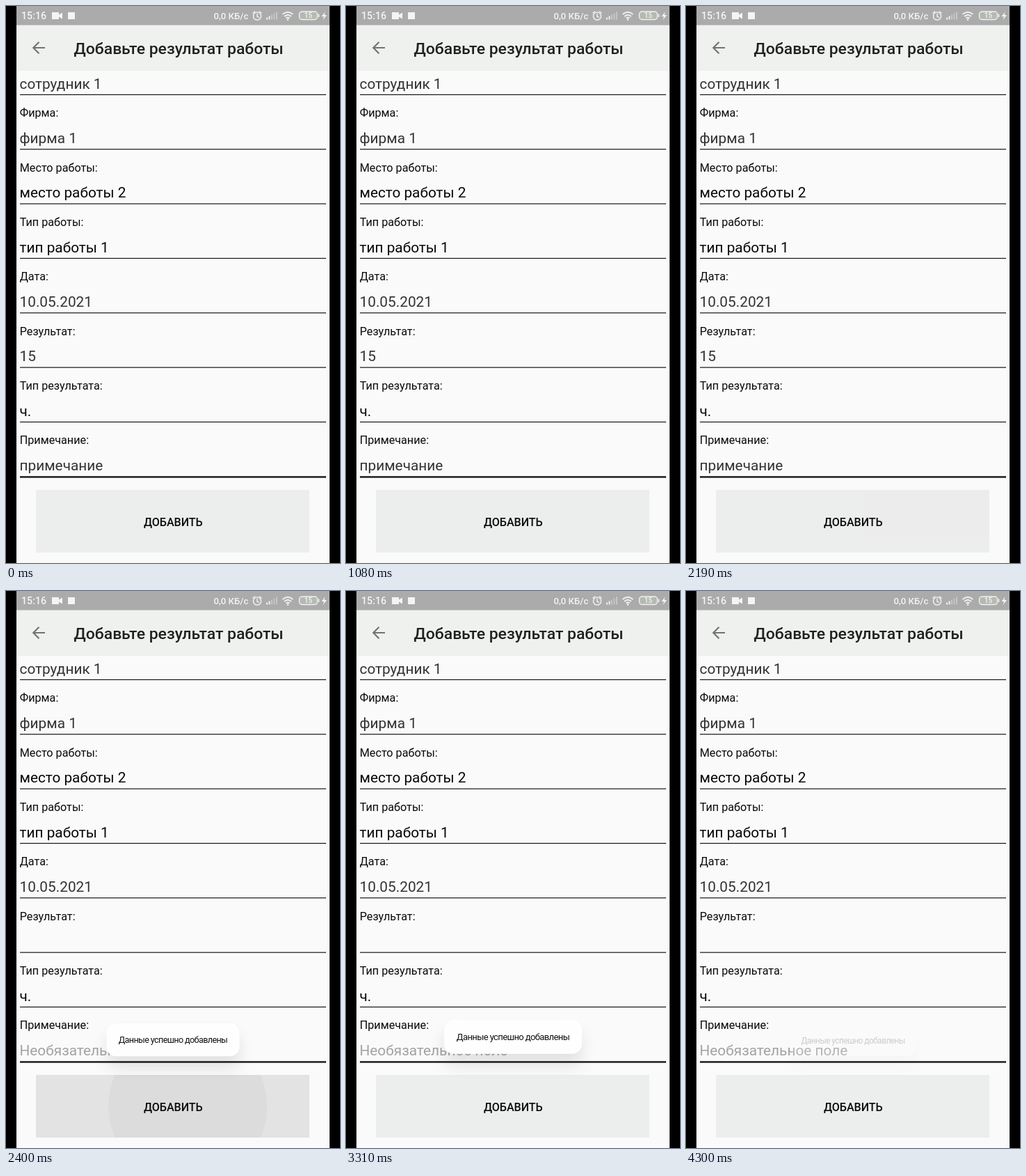
These frames come from a looping animation (480 by 800 pixels, 4.34 s). An HTML page:

```html
<!DOCTYPE html>
<html lang="ru">
<head>
<meta charset="utf-8">
<title>Добавьте результат работы</title>
<style>
html, body { margin: 0; width: 100%; height: 100%; overflow: hidden; background: #000; }
svg { display: block; width: 480px; height: 800px; font-family: Roboto, sans-serif; }
.label { font-size: 16.2px; fill: #0a0a0a; }
.field { font-size: 20.8px; }
.bar { font-size: 13.1px; font-weight: 500; fill: #f4f4f4; }
.line { fill: none; stroke: #f0f0f0; stroke-width: 1.5; }
.toast { font-size: 13px; letter-spacing: -.6px; fill: #111; }
</style>
</head>
<body>
<svg viewBox="0 0 480 800">
  <defs>
    <clipPath id="buttonClip"><rect x="43" y="695" width="393" height="90"/></clipPath>
    <filter id="blur" x="-30%" y="-100%" width="160%" height="300%"><feGaussianBlur stdDeviation="11"/></filter>
  </defs>
  <rect x="15" width="450" height="800" fill="#f9faf9"/>
  <rect x="15" y="27" width="450" height="66" fill="#eff1ef"/>
  <rect x="15" width="450" height="27.5" fill="#ababab"/>

  <!-- status bar -->
  <text class="bar" x="22" y="19" style="font-size:14.2px">15:16</text>
  <path d="M66 9h10v3.5l5-3v9l-5-3V19H66z" fill="#f4f4f4"/>
  <rect x="89" y="9" width="10" height="10" fill="#f4f4f4"/>
  <text class="bar" x="298.5" y="18.5">0,0 КБ/с</text>
  <g class="line">
    <circle cx="361" cy="14.5" r="5.6"/>
    <path d="M361 11v4l2.5 1.5M354.5 10.5l3.5-3M367.5 10.5l-3.5-3"/>
    <path d="M375 19.5v-3M378.5 19.5v-5" stroke-width="2"/>
    <path d="M382 19.5v-7M385.5 19.5v-9M389 19.5v-11" stroke-width="2" opacity=".4"/>
    <path d="M397.5 12q7.5-6.5 15 0M400 15q5-4.5 10 0M402.5 17.5q2.5-2 5 0" stroke-width="1.8"/>
    <rect x="421.5" y="8" width="26" height="11.5" rx="4" fill="#b4bab0"/>
    <path d="M449.5 11.5v4.5"/>
  </g>
  <circle cx="405" cy="19.5" r="1.3" fill="#f4f4f4"/>
  <text class="bar" x="434.5" y="17.4" text-anchor="middle" style="font-size:10px">15</text>
  <path d="M458.5 8.5l-5 6.5h3.5l-1.5 5 5.5-7h-3.5z" fill="#f4f4f4"/>

  <!-- header -->
  <path d="M56 60H39.5M47.5 51.8L39.3 60l8.2 8.2" fill="none" stroke="#737373" stroke-width="2.2"/>
  <text x="97.5" y="69" font-size="22.95" font-weight="500" fill="#202020">Добавьте результат работы</text>

  <g id="form"></g>

  <g clip-path="url(#buttonClip)">
    <rect x="43" y="695" width="393" height="90" fill="#eceeed"/>
    <g id="press">
      <rect x="43" y="695" width="393" height="90" fill="#e2e3e2"/>
      <circle id="ripple" cy="740" fill="#dadbda"/>
    </g>
  </g>
  <text x="240.3" y="746.5" text-anchor="middle" font-size="16" font-weight="500" fill="#0a0a0a">ДОБАВИТЬ</text>

  <g id="toast">
    <rect x="-99" y="-10" width="198" height="52" rx="14" opacity=".09" filter="url(#blur)"/>
    <rect x="-99" y="-24.5" width="198" height="49" rx="14" fill="#fefefe"/>
    <text class="toast" y="4.8" text-anchor="middle">Данные успешно добавлены</text>
  </g>
</svg>
<script>
const LOOP = 4340, PRESS = 2180, SHOW = 2200, HIDE = 4160;
const SOFT = "#333", DARK = "#080808", HINT = "#a3a3a3";
const ROWS = [
  ["", "сотрудник 1", SOFT],
  ["Фирма:", "фирма 1", SOFT],
  ["Место работы:", "место работы 2", DARK],
  ["Тип работы:", "тип работы 1", DARK],
  ["Дата:", "10.05.2021", SOFT],
  ["Результат:", "15", SOFT],
  ["Тип результата:", "ч.", DARK],
  ["Примечание:", "примечание", SOFT]
];
const $ = id => document.getElementById(id);
const ramp = (t, from, length) => Math.min(1, Math.max(0, (t - from) / length));
const set = (el, attrs) => { for (const k in attrs) el.setAttribute(k, attrs[k]); };

$("form").innerHTML = ROWS.map(([label, value, color], i) => {
  const y = 127.4 + i * 78.35;
  const focused = i === ROWS.length - 1;
  return `<text class="label" x="19.7" y="${y - 46.5}">${label}</text>
    <text class="field" x="19.5" y="${y - 8.7}" fill="${color}">${value}</text>
    <rect x="20" y="${y - 0.6}" width="440" height="${focused ? 2.4 : 1.2}" fill="#161616"/>`;
}).join("");
const fields = document.querySelectorAll(".field");
const result = fields[5], note = fields[7];

function draw(t) {
  const cleared = t >= SHOW;
  result.textContent = cleared ? "" : "15";
  note.textContent = cleared ? "Необязательное поле" : "примечание";
  set(note, { fill: cleared ? HINT : SOFT });

  const grow = ramp(t, PRESS, 390);
  set($("ripple"), { cx: 289 - 49 * grow, r: 201 * grow });
  set($("press"), { opacity: ramp(t, PRESS, 120) * (1 - ramp(t, 2380, 260)) });

  // The toast settles exponentially, then shrinks and fades linearly.
  const settle = Math.exp(-Math.max(0, t - SHOW) / 200);
  const leave = ramp(t, HIDE, 175);
  const scale = 1 - 0.098 * settle - 0.1 * leave;
  set($("toast"), {
    opacity: ramp(t, SHOW, 150) * (1 - leave),
    transform: `translate(240 ${640.3 + 12 * settle + 6 * leave}) scale(${scale})`
  });
}

const start = performance.now();
function tick() {
  draw((performance.now() - start) % LOOP);
  requestAnimationFrame(tick);
}
tick();
</script>
</body>
</html>
```
